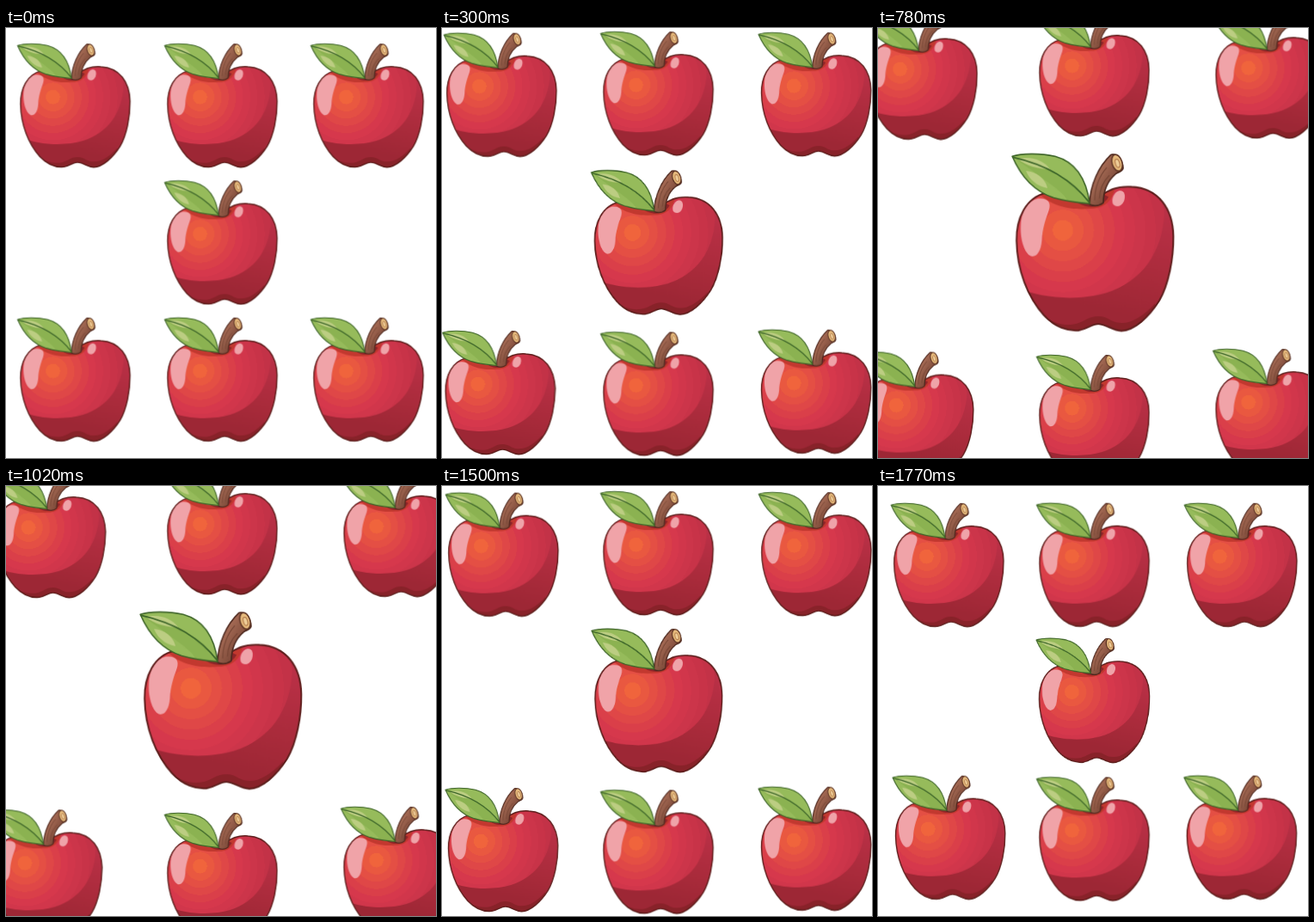
An HTML page for the animation above (1800 ms loop, 500 by 500 pixels).

```html
<!DOCTYPE html>
<html lang="en">
<head>
<meta charset="utf-8">
<title>Apples</title>
<style>
  html, body { margin: 0; width: 100%; height: 100%; overflow: hidden; background: #fff; }
  svg { display: block; width: 100vw; height: 100vh; }
</style>
</head>
<body>
<svg id="stage" viewBox="0 0 500 500">
  <defs>
    <radialGradient id="skin" gradientUnits="userSpaceOnUse" cx="215" cy="235" r="132"></radialGradient>
    <linearGradient id="shade" gradientUnits="userSpaceOnUse" x1="315" y1="215" x2="285" y2="335">
      <stop offset="0" stop-color="#b93046"/>
      <stop offset=".6" stop-color="#a92b3b"/>
      <stop offset="1" stop-color="#9d2735"/>
    </linearGradient>
    <linearGradient id="bark" gradientUnits="userSpaceOnUse" x1="252" y1="172" x2="272" y2="184">
      <stop offset="0" stop-color="#a76c56"/>
      <stop offset="1" stop-color="#7f4c3b"/>
    </linearGradient>
    <path id="body" d="M248 203 C235 193 213 188 195 191.500 C172 197 160.500 221 161 247
      C161.500 281 174 313 193 334 C206 348 221 352.500 233 351.500 C245 349.500 249 343 257 344
      C267 345 272 351.500 283 352 C298 351.500 315 336 327 317 C338 298 343.800 268 343.500 242
      C343 210 326 186 295 184.500 C281 183.500 268 187 258 196 Z"/>
    <path id="leaf" d="M156 149 C166 145.500 189 145 206 149 C228 155 242 173 246 204
      C233 203 218 201 204 197 C182 190 166 172 156 149 Z"/>
    <clipPath id="inBody"><use href="#body"/></clipPath>
    <clipPath id="inLeaf"><use href="#leaf"/></clipPath>

    <g id="apple" transform="scale(.6974) translate(-250 -249.300)">
      <use href="#body" fill="url(#skin)"/>
      <g clip-path="url(#inBody)">
        <path fill="url(#shade)" d="M163 302 C190 315 235 317 265 308 C306 295 331 262 333 214
          C332 204 329 196 324 190 L360 190 V370 H160 Z"/>
        <path fill="#7f2024" d="M184 328 C207 349 227 347 240 340 C251 333 263 334 271 340
          C288 348 306 338 322 320 L330 360 H190 Z" opacity=".7"/>
        <path fill="#c2382f" d="M184 188 C198 207 224 212 246 210 C260 210 271 204 275 188 L250 180 Z"/>
        <path fill="#8d2429" d="M228 199 C238 211 260 211 268 196 L256 190 Z"/>
      </g>
      <path fill="#f0a3a8" d="M186 198 C197 197 202 202 198.500 212 C195 222 191 233 190.500 247
        C189.500 260 184 267 177.500 265 C169 260 165 243 166 228 C167 213 174 201 186 198 Z"/>
      <path fill="#efa3a9" d="M281 189 C287 189 288 195 286 201 C283 208 276 209 273 204
        C271 198 275 190 281 189 Z"/>
      <use href="#body" fill="none" stroke="#5e1f1d" stroke-width="2" stroke-linejoin="round"/>

      <path fill="url(#bark)" stroke="#4d281e" stroke-width="1.600" stroke-linejoin="round"
        d="M246 205 C246 183 257 160 271 147 C277 145 285 153 285 163 C284 167 280 167 277 169
        C266 178 262 190 262 203 C257 207 251 207 246 205 Z"/>
      <path fill="none" stroke="#774736" stroke-width="1.200"
        d="M252 200 C252 185 258 171 266 162 M257.500 198 C258 187 262 178 269 171"/>
      <ellipse cx="278" cy="156.500" rx="5.800" ry="9.800" transform="rotate(-17 278 156.500)"
        fill="#e6ba7c" stroke="#5d3323" stroke-width="1.500"/>
      <ellipse cx="278.500" cy="157" rx="2.500" ry="5" transform="rotate(-17 278.500 157)"
        fill="#efce98" stroke="#b47c4d" stroke-width="1.200"/>

      <use href="#leaf" fill="#96bb5b"/>
      <g clip-path="url(#inLeaf)">
        <path fill="#8bb251" d="M156 149 C192 158 224 175 246 204 L222 212 C226 197 206 186 188 172 Z"/>
        <path fill="#bccd82" d="M163 152 C176 148 193 153 200 164 C188 164 172 160 163 152 Z
          M172 166 C184 167 195 175 197 186 C185 184 176 176 172 166 Z"/>
      </g>
      <path fill="none" stroke="#3c6529" stroke-width="1.800" d="M157 150 C193 158 224 174 246 203"/>
      <use href="#leaf" fill="none" stroke="#3d6428" stroke-width="1.600" stroke-linejoin="round"/>
    </g>
  </defs>
</svg>
<script>
const LOOP = 1800;
const NS = "http://www.w3.org/2000/svg";
const stage = document.getElementById("stage");

function add(parent, tag, attrs) {
  const el = document.createElementNS(NS, tag);
  for (const key in attrs) el.setAttribute(key, attrs[key]);
  return parent.appendChild(el);
}

// Flat colour rings spreading from the orange glow
const skin = document.getElementById("skin");
const RINGS = 11;
const glow = [240, 100, 60], red = [214, 56, 76], rim = [190, 48, 70];
const mix = (a, b, k) => a.map((c, n) => Math.round(c + (b[n] - c) * k));
for (let i = 0; i < RINGS; i++) {
  const k = i / (RINGS - 1);
  const rgb = k < 0.5 ? mix(glow, red, Math.pow(k * 2, 0.8)) : mix(red, rim, k * 2 - 1);
  for (const edge of [i, i + 1]) add(skin, "stop", { offset: edge / RINGS, "stop-color": `rgb(${rgb})` });
}

// Home position, furthest shift, shift at the end of the return, scales
const apples = [
  { home: [79, 90.3], far: [-33.5, -37.5], back: [3, 3] },
  { home: [250, 90.3], far: [0, -42], back: [0, 3] },
  { home: [420, 90.3], far: [40.5, -39], back: [0.5, 3] },
  { home: [250, 249.5], far: [0, 0], back: [0, 0], scale: [1.5, 0.99] },
  { home: [79, 408.8], far: [-38.5, 46], back: [5, -1.5] },
  { home: [250, 408.8], far: [0, 50], back: [0, 0] },
  { home: [420, 408.8], far: [40.5, 42], back: [0, -1.5] }
];

for (const { home, far, back, scale = [1, 1] } of apples) {
  const pose = ([dx, dy], s) => ({
    transform: `translate(${home[0] + dx}px, ${home[1] + dy}px) scale(${s})`,
    easing: "steps(30, end)"
  });
  const el = add(stage, "use", { href: "#apple" });
  el.animate([pose([0, 0], 1), pose(far, scale[0]), pose(back, scale[1])],
    { duration: LOOP, iterations: Infinity });
}
</script>
</body>
</html>
```
